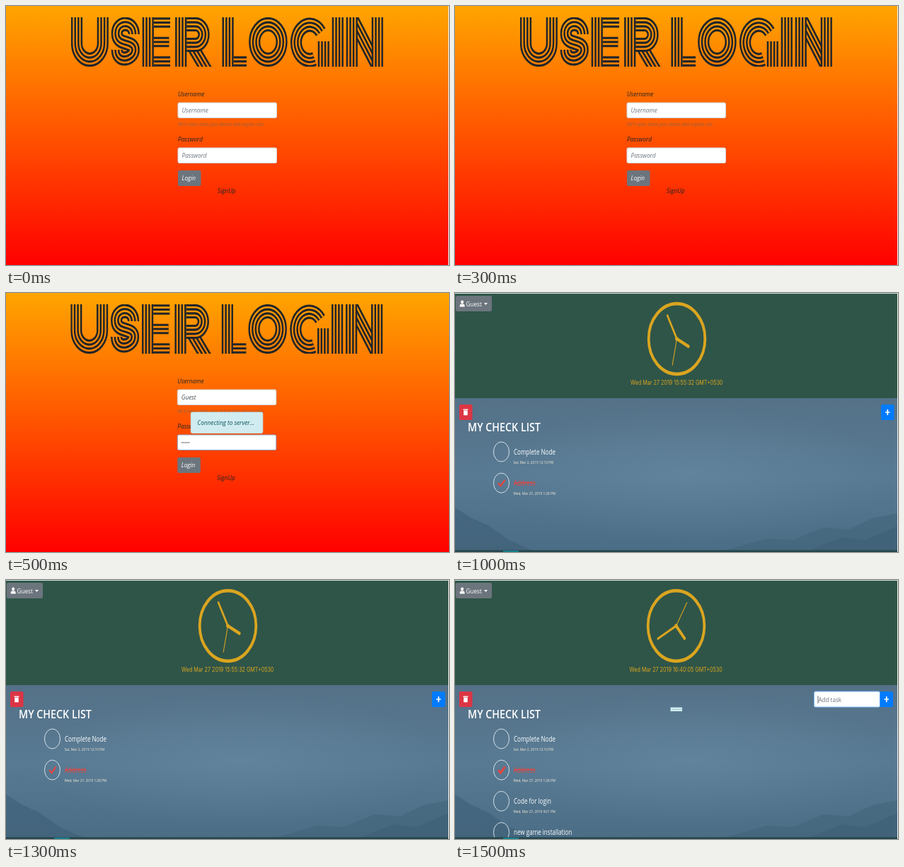
Write an HTML page that moves like this. It is 626x367 px and loops after 2 s.

```html
<!DOCTYPE html>
<html lang="en">
<head>
<meta charset="utf-8">
<title>Login and check list</title>
<style>
  html, body { margin: 0; width: 100%; height: 100%; overflow: hidden; }
  svg { display: block; width: 626px; height: 367px; }
  text { font-family: "Open Sans", "Noto Sans", sans-serif; white-space: pre; }
  .form text { font-style: italic; }
</style>
</head>
<body>
<svg id="stage" viewBox="0 0 626 367">
  <defs>
    <linearGradient id="sunset" gradientUnits="userSpaceOnUse" x1="0" y1="0" x2="0" y2="367">
      <stop stop-color="#ffa500"/><stop offset="1" stop-color="#f00"/>
    </linearGradient>
    <linearGradient id="sky" x2="0" y2="1">
      <stop stop-color="#547187"/><stop offset=".5" stop-color="#587a93"/><stop offset="1" stop-color="#4b6d85"/>
    </linearGradient>
    <radialGradient id="haze">
      <stop stop-color="#6a8ca5" stop-opacity=".5"/><stop offset="1" stop-color="#6a8ca5" stop-opacity="0"/>
    </radialGradient>
    <clipPath id="titleBox"><rect y="16" width="560" height="70"/></clipPath>
  </defs>
  <g id="scene"></g>
</svg>
<script>
const USER = 'Guest';
const INK = '#212529', GREY = '#6c757d', GOLD = '#daa520', RED = '#e8443f';

const box = (x, y, w, h, fill, extra = '') =>
  `<rect x="${x}" y="${y}" width="${w}" height="${h}" fill="${fill}" ${extra}/>`;
const line = (d, color, width, extra = '') =>
  `<path d="${d}" fill="none" stroke="${color}" stroke-width="${width}" ${extra}/>`;
// The screen is narrowed, so its type is too.
const label = (x, y, size, str, fill, squash = .81, extra = '') =>
  `<text transform="translate(${x} ${y}) scale(${squash} 1)" font-size="${size}" fill="${fill}" ${extra}>${str}</text>`;
const edge = box(625, 0, 1, 367, '#f4f4f0');

// Parallel-line lettering: alternating dark and background strokes.
const stripes = (d, count) => {
  const ink = 3.1, gap = 2.6;
  let out = '';
  for (let w = count * ink + (count - 1) * gap, dark = true; w > 0; dark = !dark) {
    out += line(d, dark ? INK : 'url(#sunset)', w);
    w -= 2 * (dark ? ink : gap);
  }
  return out;
};

function title() {
  const strokes = [
    'M10 16V53a23 23 0 0 0 46 0V16',
    'M111 40C111 21 81 21 81 39S111 48 111 62S81 81 81 62',
    'M136 16V86',
    'M212 54L240 92', 'M204 26H220a14.5 14.5 0 0 1 0 29H204', 'M194 16V86',
    'M277 16V86',
    'M324 51a24 25 0 1 0 48 0a24 25 0 1 0-48 0z',
    'M441 37A24 25 0 1 0 430 75', 'M446 50V86',
    'M471 16V86',
    'M496 16L541 86', 'M496 16V86', 'M541 16V86'
  ];
  const arms = ['M146 23.5H175', 'M146 51H173', 'M146 78.5H175', 'M287 78.5H310'];
  return `<g transform="translate(92) scale(.8 1)" clip-path="url(#titleBox)">
    ${strokes.map(d => stripes(d, 4)).join('')}${arms.map(d => stripes(d, 3)).join('')}</g>`;
}

function login(sent) {
  const word = (x, y, str, fill, size = 9.2) => label(x, y, size, str, fill, .9);
  const field = (y, border) => box(243, y, 139.5, 21.5, '#fff', `rx="2" stroke="${border}" stroke-width="1"`);
  let form = title()
    + word(243, 128, 'Username', INK) + field(137, '#ced4da')
    + word(248.5, 151, sent ? USER : 'Username', sent ? '#495057' : GREY)
    + word(243, 170, "We'll never share your details with anyone else.", '#8f6248', 6.6)
    + word(243, 192, 'Password', INK) + field(201, sent ? '#8f9fc4' : '#ced4da')
    + (sent ? line('M249.5 212H260', '#333', 1.6, 'stroke-linecap="round" stroke-dasharray="0 2.4"')
            : word(248.5, 215, 'Password', GREY))
    + box(243, 233, 32.5, 22, GREY, 'rx="2"') + word(248.5, 247, 'Login', '#fff')
    + word(299, 265, 'SignUp', INK);
  if (sent) form += box(262, 169, 101.5, 29.5, '#d1ecf1', 'rx="2" stroke="#bee5eb"')
    + word(271, 187, 'Connecting to server...', '#0c5460');
  return box(0, 0, 626, 367, 'url(#sunset)')
    + `<g class="form" transform="translate(${sent ? -.7 : 0})">${form}</g>` + (sent ? '' : edge);
}

function clock(cx, h, m, s) {
  const hand = (turn, length, width) =>
    `<path d="M0 0V${-length}" stroke-width="${width}" transform="rotate(${turn * 360})"/>`;
  const time = [h, m, s].map(n => String(n).padStart(2, '0')).join(':');
  return `<g transform="translate(${cx} 65) scale(.8 1)" fill="none" stroke="${GOLD}" stroke-linecap="round">
    <circle r="49.8" stroke-width="4.8"/><circle r="2.5" fill="${GOLD}"/>
    ${hand((h + m / 60) / 12, 23, 4.6)}${hand((m + s / 60) / 60, 37, 3.2)}${hand(s / 60, 38, 1.3)}</g>`
    + label(cx - .3, 130, 9, `Wed Mar 27 2019 ${time} GMT+0530`, GOLD, .8,
            'text-anchor="middle" style="font-family:Inter,sans-serif"');
}

function task(i, name, date, tick) {
  const y = 225 + i * 44.2;
  return `<ellipse cx="65.5" cy="${y}" rx="11" ry="14" fill="none" stroke="#e4ebf0" stroke-width=".9"/>`
    + (tick ? line(`M61 ${y}l3.6 4 6-8.5`, RED, tick) : '')
    + label(83, y + 3.5, 10, name, tick ? RED : '#fff', .81, tick ? 'text-decoration="line-through"' : '')
    + label(82.5, y + 17, 5.9, date, '#f5ecd9', .8);
}

function photo() {
  return box(0, 149, 626, 216, 'url(#sky)')
    + '<ellipse cx="330" cy="255" rx="290" ry="95" fill="url(#haze)"/>'
    + '<path d="M0 304L22 318 48 330 76 350 110 365H0z" fill="#3f6077" opacity=".6"/>'
    + '<path d="M380 365L440 348 478 350 520 332 556 335 590 319 626 312V365z" fill="#43647b" opacity=".55"/>'
    + '<path d="M500 365L548 346 580 350 626 330V365z" fill="#3b5b71" opacity=".45"/>';
}

function checklist(adding) {
  let out = box(0, 0, 626, 367, '#2f5548') + box(0, 0, 626, 1, '#cfe3e2')
    + box(1, 4, 51, 22, GREY, 'rx="2"')
    + '<path d="M6.7 19.5v-1.5q0-2.5 2.2-2.5h2.6q2.2 0 2.2 2.5v1.5z" fill="#fff"/>'
    + '<ellipse cx="10.2" cy="12.7" rx="2" ry="2.5" fill="#fff"/>'
    + label(15.5, 19, 9.6, USER, '#fff', .85)
    + '<path d="M41 14h5l-2.5 3z" fill="#fff"/>'
    + (adding ? clock(312.5, 16, 40, 5) : clock(313.5, 15, 55, 32))
    + photo()
    + box(6, 158, 18.5, 22, '#dc3545', 'rx="2"')
    + box(11.5, 164.5, 7, 1.4, '#fff') + box(12.2, 166.5, 5.6, 6.8, '#fff', 'rx=".6"')
    + label(18, 196, 17, 'MY CHECK LIST', '#fff', .84, 'font-weight="600"')
    + task(0, 'Complete Node', 'Sat, Mar 2, 2019 12:10 PM')
    + task(1, 'Address', 'Wed, Mar 27, 2019 1:28 PM', adding ? 3 : 2.2);
  if (adding) out += task(2, 'Code for login', 'Wed, Mar 27, 2019 4:01 PM')
    + task(3, 'new game installation', '')
    + box(507.5, 158, 93, 22, '#fff', 'rx="2" stroke="#80bdff"')
    + line('M513 164V175', '#333', .7) + label(513.5, 173, 9.4, 'Add task', GREY, .86)
    + box(304.5, 180.5, 16.5, 5.5, '#d1ecf1') + label(306.5, 184, 2.2, 'Adding new task', '#4d8290', .8);
  const x = adding ? 600.5 : 602;
  return out + box(x, 158, 18.5, 22, '#007bff', 'rx="2"')
    + line(`M${x + 6} 169h6.6m-3.3-4v8`, '#fff', 1.7)
    + box(0, 364.5, 626, 2.5, '#24464b') + box(68, 365, 22, 2, '#167f8c') + edge;
}

const scenes = [login(false), login(true), checklist(false), checklist(true)];
const scene = document.getElementById('scene');
const start = performance.now();
let shown = -1;
function tick() {
  const now = Math.floor((performance.now() - start) % 2000 / 500);
  if (now !== shown) scene.innerHTML = scenes[shown = now];
  requestAnimationFrame(tick);
}
tick();
</script>
</body>
</html>
```
